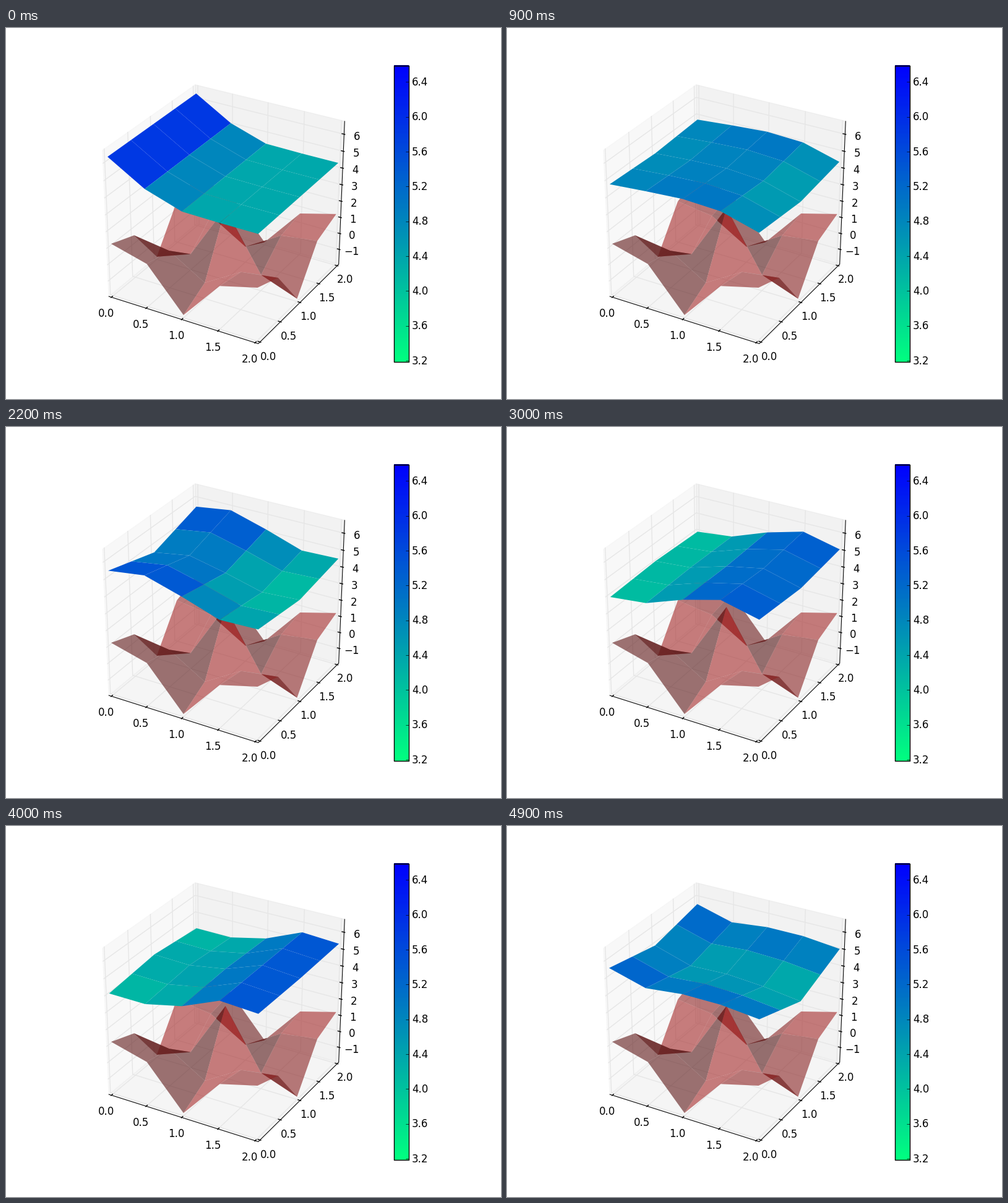
A matplotlib script that plays this animation: 800 by 600 pixels, repeating every 5 s.

```python
import numpy as np
import matplotlib.pyplot as plt
from matplotlib.animation import FuncAnimation
from matplotlib.collections import LineCollection, PolyCollection

plt.rcParams["font.family"] = "DejaVu Sans"
W, H, FRAMES, STEP = 800, 600, 50, 100
Z_LOW, Z_HIGH = -1.768, 6.594
C_LOW, C_HIGH = 3.187, 6.594
CMAP = plt.get_cmap("winter_r")

# Camera at distance 10, and the plot area 496 x 480 px it is mapped to
ELEV, AZIM = np.radians([30, -60])
RIGHT = np.array([-np.sin(AZIM), np.cos(AZIM), 0])
TOWARD = np.array([np.cos(ELEV) * np.cos(AZIM), np.cos(ELEV) * np.sin(AZIM),
                   np.sin(ELEV)])
UP = np.cross(TOWARD, RIGHT)
SX, SY = 496 / 0.185, 480 / 0.185
CX, CY = 100 + 0.095 * SX, 540 - 0.095 * SY

GX, GY = np.meshgrid(np.linspace(0, 2, 5), np.linspace(0, 2, 5))


def project_cube(cube):
    """Stage positions and eye distances of points in the centred unit cube."""
    cube = np.asarray(cube, float)
    depth = 10 - cube @ TOWARD
    x = CX + SX * (cube @ RIGHT) / depth
    y = CY - SY * (cube @ UP) / depth
    return np.stack([x, y], axis=-1), depth


def facets(z):
    """Quads of the surface as data points, shape (16, 4, 3)."""
    g = np.stack([GX, GY, z], axis=-1)
    quads = np.stack([g[:-1, :-1], g[:-1, 1:], g[1:, 1:], g[1:, :-1]], axis=2)
    return quads.reshape(16, 4, 3)


def facet_mean(values):
    """Mean over the closed outline, which meets its first corner twice."""
    return np.average(values, axis=1, weights=[2, 1, 1, 1])


def paint(collection, quads, colors):
    span = np.array([2, 2, Z_HIGH - Z_LOW])
    flat, depth = project_cube((quads - [0, 0, Z_LOW]) / span - 0.5)
    order = np.argsort(-facet_mean(depth))
    collection.set_verts(list(flat[order]))
    collection.set_facecolor(colors[order])


def ground_height():
    return 2.5 * np.cos(1.25 * np.pi * (GX - 1)) * np.cos(1.25 * np.pi * (GY - 1))


def water_height(t):
    """Standing waves in a square basin, released from a hump along x = 0."""
    def mode(nx, ny):
        return np.cos(nx * np.pi * GX / 2) * np.cos(ny * np.pi * GY / 2)

    def swing(period):
        return np.cos(2 * np.pi * t / period)

    # Two close periods beat, so the double wave wanders between x and y
    even, odd = 0.24 * swing(0.695), 0.24 * swing(0.645)
    third = swing(0.493)
    return (4.79 + 0.76 * swing(1.162) * mode(1, 0)
            + (even + odd) * mode(2, 0) + (even - odd) * mode(0, 2)
            + 0.24 * third * mode(3, 0)
            - 0.12 * (1 - np.exp(-2 * t)) * third * mode(1, 2)
            + 0.075 * swing(0.35) * mode(4, 0))


fig = plt.figure(figsize=(W / 100, H / 100), dpi=100, facecolor="white")
ax = fig.add_axes([0, 0, 1, 1])
ax.axis("off")


def lines(paths, color, width=1.0, zorder=2):
    ax.add_collection(LineCollection(paths, colors=color, linewidths=width,
                                     zorder=zorder))


def cube_lines(paths, *style):
    lines([project_cube(p)[0] for p in paths], *style)


def label(x, baseline, text, ha="center"):
    ax.text(x, baseline - 0.5, text, fontsize=12, ha=ha, va="baseline", zorder=8)


# Box: panes, grid, axis lines, ticks and their labels
hi = 0.5 + 1 / 48
lo = -hi
panes = [
    (0.95, [(lo, lo, lo), (lo, hi, lo), (lo, hi, hi), (lo, lo, hi)]),
    (0.90, [(lo, hi, lo), (hi, hi, lo), (hi, hi, hi), (lo, hi, hi)]),
    (0.925, [(lo, lo, lo), (hi, lo, lo), (hi, hi, lo), (lo, hi, lo)]),
]
for shade, corners in panes:
    tone = (shade, shade, shade, 0.5)
    ax.add_collection(PolyCollection([project_cube(corners)[0]],
                                     facecolors=[tone], edgecolors=[tone],
                                     linewidths=1, zorder=1))

sides = np.linspace(-0.5, 0.5, 5)
levels = np.arange(-1, 7)
rises = (levels - Z_LOW) / (Z_HIGH - Z_LOW) - 0.5
grid = [[(s, lo, lo), (s, hi, lo), (s, hi, hi)] for s in sides]
grid += [[(hi, s, lo), (lo, s, lo), (lo, s, hi)] for s in sides]
grid += [[(lo, lo, r), (lo, hi, r), (hi, hi, r)] for r in rises]
cube_lines(grid, (0.9, 0.9, 0.9))
cube_lines([[(lo, lo, lo), (hi, lo, lo), (hi, hi, lo), (hi, hi, hi)]],
           "black", 0.75, 3)

out, inn, gap = 0.1 / 12, 0.2 / 12, 0.7 / 12
marks = [[(s, lo - out, lo), (s, lo + inn, lo)] for s in sides]
marks += [[(hi + out, s, lo), (hi - inn, s, lo)] for s in sides]
marks += [[(hi + out, hi, r), (hi - inn, hi, r)] for r in rises]
cube_lines(marks, "black", 1, 3)

places = [(s, lo - gap, lo - gap) for s in sides]
places += [(hi + gap, s, lo - gap) for s in sides]
places += [(hi + gap, hi + gap, r) for r in rises]
names = [f"{2 * s + 1:.1f}" for s in sides] * 2
names += [str(n).replace("-", "\u2212") for n in levels]
for (x, y), name in zip(project_cube(places)[0], names):
    label(x - 0.5, y + 12, name)

# Colour bar
ax.imshow(np.linspace(1, 0, 256)[:, None], cmap=CMAP, aspect="auto",
          extent=(627, 651, 540, 60), interpolation="nearest", zorder=2)
lines([[(627, 60.5), (651, 60.5), (651, 540), (627, 540), (627, 60.5),
        (651, 60.5)]], "black", 1, 4)
for value in np.arange(3.2, 6.5, 0.4):
    y = 540 - 480 * (value - C_LOW) / (C_HIGH - C_LOW)
    lines([[(645.5, y), (651, y)]], "black", 0.5, 4)
    label(656, y + 6, f"{value:.1f}", "left")

# Ground, lit from the front left
ground = facets(ground_height())
normals = np.cross(ground[:, 0] - ground[:, 1], ground[:, 1] - ground[:, 3])
normals /= np.linalg.norm(normals, axis=1)[:, None]
light = normals @ [-1, -1, 0.5]
light = 0.5 + 0.5 * (light - light.min()) / np.ptp(light)
brown = np.array([165, 42, 42]) / 255
bed = PolyCollection([], linewidths=0, antialiaseds=True, zorder=5)
ax.add_collection(bed)
paint(bed, ground, np.column_stack([light[:, None] * brown, np.full(16, 0.6)]))

surface = PolyCollection([], linewidths=0, antialiaseds=True, zorder=6)
ax.add_collection(surface)
ax.set_xlim(0, W)
ax.set_ylim(H, 0)


def update(frame):
    quads = facets(water_height(frame * STEP / 1000))
    level = (facet_mean(quads[:, :, 2]) - C_LOW) / (C_HIGH - C_LOW)
    paint(surface, quads, CMAP(level))
    return (surface,)


anim = FuncAnimation(fig, update, frames=FRAMES, interval=STEP, repeat=True,
                     repeat_delay=0, blit=False)
plt.show()
```
